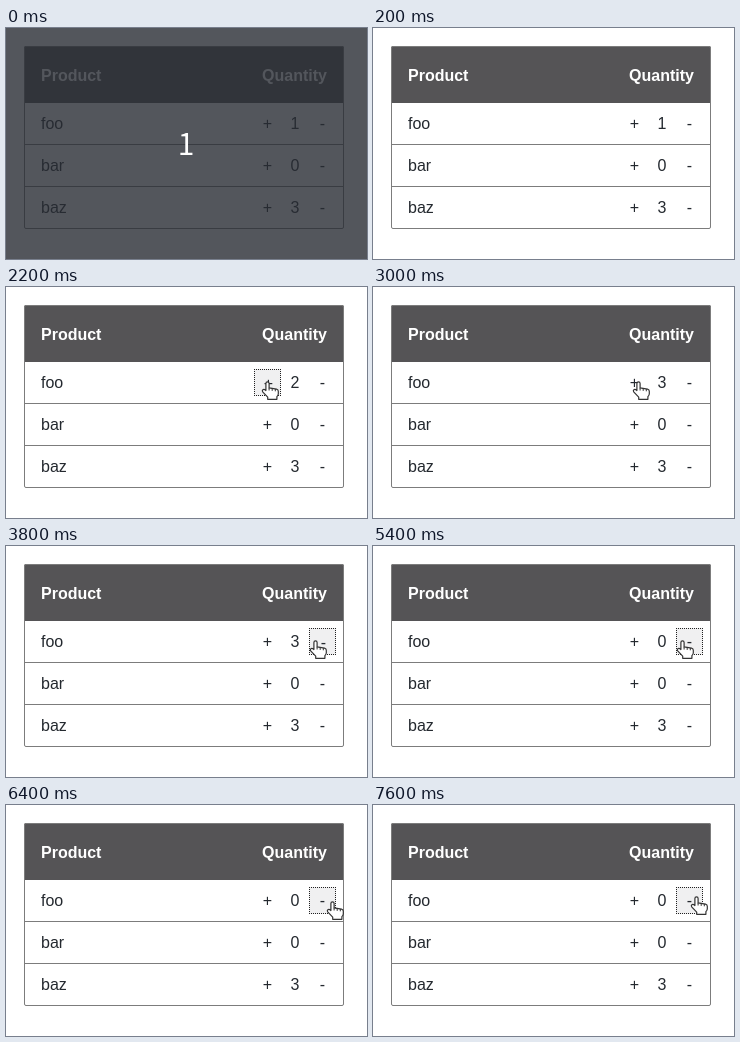
An HTML page that plays this animation: 361 px wide and 231 px high, repeating every 8000 ms.

```html
<!DOCTYPE html>
<html lang="en">
<head>
<meta charset="utf-8">
<title>Product quantities</title>
<style>
  html, body { margin: 0; width: 100%; height: 100%; overflow: hidden; background: #fff; }
  svg { display: block; width: 361px; height: 231px; }
  text { font: 16px "Liberation Sans", Arial, sans-serif; fill: #24292f; }
  .head { font-weight: bold; fill: #fff; }
  .mid { text-anchor: middle; }
  .end { text-anchor: end; }
  .line { fill: none; stroke: #7c7c7c; }
  .count { font: 30px "Noto Sans CJK JP", "Noto Sans CJK SC", sans-serif; fill: #fff; }
</style>
</head>
<body>
<svg viewBox="0 0 361 231">
  <rect width="361" height="231" fill="#fff"/>
  <path d="M18 75V20q0-2 2-2H336q2 0 2 2V75Z" fill="#555456"/>
  <rect class="line" x="18.5" y="18.5" width="319" height="182" rx="1.5"/>
  <path class="line" d="M19 116.5H337M19 158.5H337"/>
  <text class="head" x="35" y="53">Product</text>
  <text class="head end" x="321" y="53">Quantity</text>
  <g id="focus">
    <rect width="27" height="27" fill="#f0f0f1"/>
    <rect x=".5" y=".5" width="26" height="26" fill="none" stroke="#222"
      stroke-dasharray="1" stroke-dashoffset=".5" shape-rendering="crispEdges"/>
  </g>
  <g id="rows"></g>
  <g id="hand" fill="#fff" stroke="#333" stroke-width="1.2" stroke-linejoin="round">
    <path d="M-1.6 8V1Q-1.6-.6 0-.6T1.6 1V5.4L9 6.6Q10.8 7 10.8 8.8V11.5Q10.6 13 9.4 14.2V16.8H.2V14.6L-4.8 9.4Q-5.6 8.2-4.6 7.3T-1.6 8Z"/>
    <path d="M1.6 5.4V8M4.7 6V8.4M7.8 6.5V8.8" fill="none" stroke-width="1"/>
  </g>
  <path id="arrow" d="M0 0V15L3.5 11.8L6 17.6L8.4 16.5L6 11H10.8Z" fill="#111" stroke="#fff"/>
  <g id="intro">
    <rect width="361" height="231" fill="#282c34" fill-opacity=".8"/>
    <text class="count mid" x="180" y="126.5">1</text>
  </g>
</svg>
<script>
const LOOP = 8000, STEP = 100, INTRO_END = 200, ENTER = 600, BLUR = 2500;
const PLUS_X = 248, MINUS_X = 303, FIRST_Y = 82, ROW_H = 42, SIZE = 27;
const $ = id => document.getElementById(id);

// Pointer legs: [start, end, x, y]
const entry = [300, 115];
const legs = [
  [500, 1100, 260.5, 95],
  [2900, 3400, 308.5, 95],
  [5600, 6000, 304, 170],
  [6000, 6400, 326, 97],
  [6400, 6600, 322.5, 92]
];
// Clicks: [down, up, change]
const clicks = [
  [1800, 1800, 1], [2200, 2400, 1],
  [3800, 4000, -1], [4300, 4700, -1], [5100, 5400, -1],
  [6800, 7000, -1], [7500, 7600, -1]
];

const ease = u => u * u * (3 - 2 * u);
const clamp = u => Math.min(1, Math.max(0, u));
const within = (v, start) => v >= start && v < start + SIZE;
const place = (el, x, y) => el.setAttribute("transform", `translate(${x} ${y})`);
const show = (el, on) => el.setAttribute("visibility", on ? "visible" : "hidden");

function pointerAt(t) {
  return legs.reduce(([px, py], [from, to, x, y]) => {
    const u = ease(clamp((t - from) / (to - from)));
    return [px + (x - px) * u, py + (y - py) * u];
  }, entry).map(Math.round);
}

function overButton(x, y) {
  const inRow = [0, 1, 2].some(i => within(y, FIRST_Y + i * ROW_H));
  return inRow && (within(x, PLUS_X) || within(x, MINUS_X));
}

$("rows").innerHTML = [["foo", 1], ["bar", 0], ["baz", 3]].map(([name, n], i) => {
  const y = 101 + i * ROW_H;
  return `<text x="35" y="${y}">${name}</text>
    <text class="mid" x="261.5" y="${y}">+</text>
    <text class="mid" x="289" y="${y}">${n}</text>
    <text class="mid" x="316.5" y="${y}">-</text>`;
}).join("");
const [, plus, amount, minus] = $("rows").children;

function draw(t) {
  show($("intro"), t < INTRO_END);
  amount.textContent = clicks.filter(([, up]) => up <= t)
    .reduce((n, [, , change]) => Math.max(0, n + change), 1);

  const [down, up, change] = clicks.findLast(c => c[0] <= t) ?? [];
  const focused = change && !(down < BLUR && t >= BLUR);
  show($("focus"), focused);
  place($("focus"), change > 0 ? PLUS_X : MINUS_X, FIRST_Y);

  for (const [label, sign] of [[plus, 1], [minus, -1]]) {
    const shift = change === sign && t < up ? 1 : 0;
    place(label, shift, shift);
  }

  const [x, y] = pointerAt(t);
  const hover = overButton(x, y);
  show($("hand"), t >= ENTER && hover);
  show($("arrow"), t >= ENTER && !hover);
  place($(hover ? "hand" : "arrow"), x + .5, y + .5);
}

const start = performance.now();
function tick() {
  const t = (performance.now() - start) % LOOP;
  draw(Math.floor(t / STEP) * STEP);
  requestAnimationFrame(tick);
}
tick();
</script>
</body>
</html>
```
